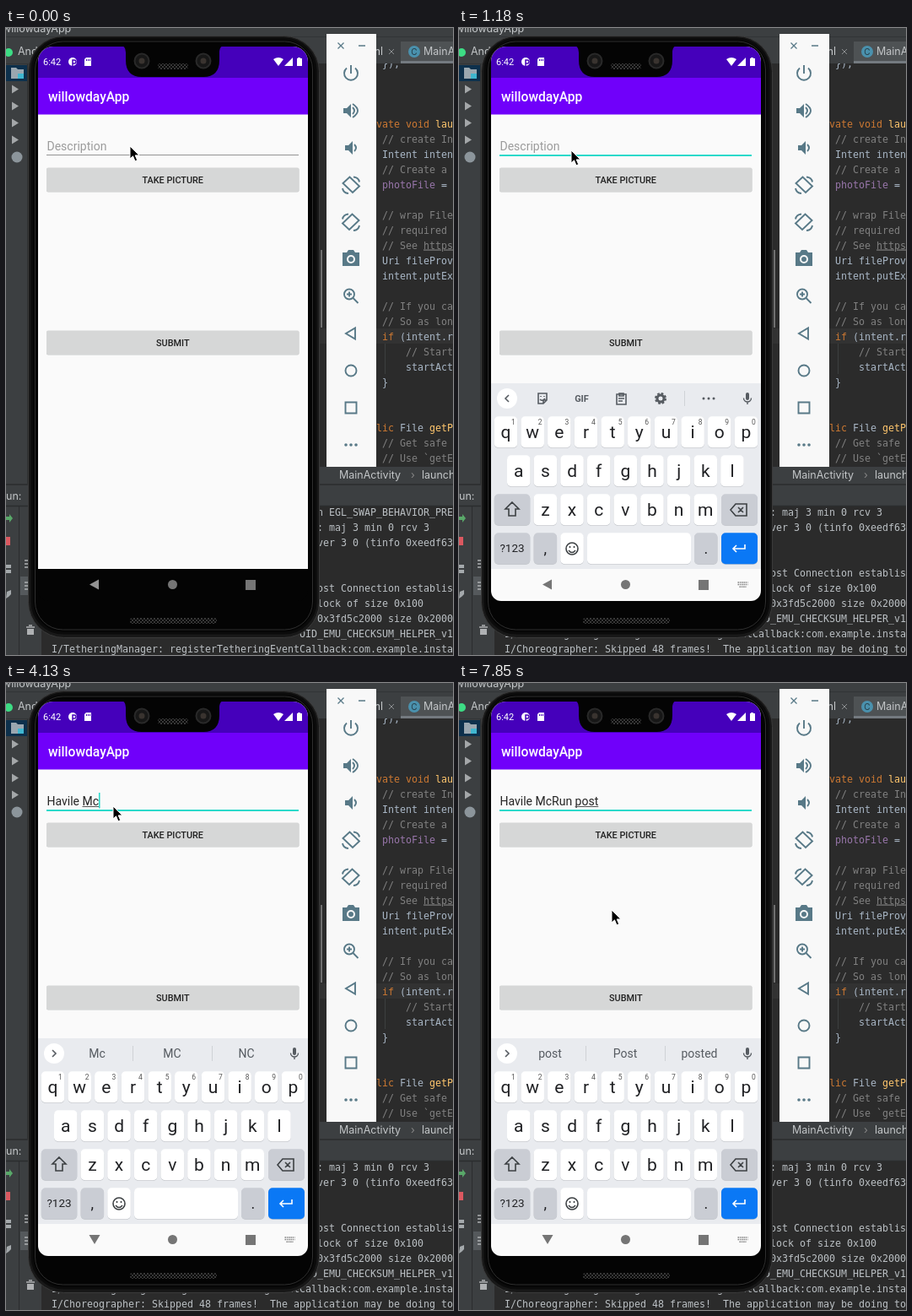
Write an HTML page that moves like this. It is 530 px wide and 743 px high and loops after 8000 ms.

```html
<!DOCTYPE html>
<html lang="en">
<head>
<meta charset="utf-8">
<title>Post form demo</title>
<style>
html, body { margin: 0; width: 100%; height: 100%; overflow: hidden; background: #3c3f41; }
svg { display: block; width: 100vw; height: 100vh; }
text { white-space: pre; }
.ide { font: 12.5px Inter, sans-serif; fill: #c3c6c8; }
.mono { font: 11.63px "DejaVu Sans Mono", monospace; fill: #bbc0c4; }
.phone { font-family: Roboto, sans-serif; }
.mid { text-anchor: middle; }
.line { fill: none; stroke: currentColor; stroke-width: 1.6; }
.tools { color: #587987; }
.tools .line { stroke-width: 1.9; }
.kb { color: #565b61; }
.field { font-size: 14px; }
</style>
</head>
<body>
<svg viewBox="0 0 530 743">
  <defs>
    <clipPath id="screen"><path d="M38 40a18 18 0 0 1 18-18h284a18 18 0 0 1 18 18v627a12 12 0 0 1-12 12H50a12 12 0 0 1-12-12z"/></clipPath>
    <pattern id="mesh" width="4" height="4" patternUnits="userSpaceOnUse">
      <path d="M0 0 4 4M4 0 0 4" stroke="#444" stroke-width=".8"/>
    </pattern>
  </defs>

  <!-- IDE -->
  <rect width="530" height="743" fill="#3c3f41"/>
  <path d="M0 10.5H530M0 42.5H530" stroke="#323436"/>
  <rect x="360" y="42" width="170" height="478" fill="#2b2b2b"/>
  <rect x="360" y="356" width="170" height="18" fill="#323232"/>
  <path d="M449.5 374v36" stroke="#3d3f40"/>
  <g id="code" class="mono"></g>
  <rect x="360" y="11" width="170" height="31" fill="#3c3f41"/>
  <rect x="468" y="16" width="62" height="26" fill="#4e5254"/>
  <rect x="468" y="39" width="62" height="3" fill="#747a80"/>
  <circle cx="484" cy="28" r="7" fill="#4a91ad"/>
  <g class="ide">
    <text x="-4" y="4.500">willowdayApp</text>
    <text x="14" y="32">Android</text>
    <text x="433" y="32">ml</text>
    <text x="484" y="32" class="mid" font-size="10" style="fill:#263b45">C</text>
    <text x="495" y="32">MainActivity</text>
    <text x="395" y="534">MainActivity</text>
    <text x="480" y="534" style="fill:#888">›</text>
    <text x="493" y="534">launchCamera</text>
    <text x="-8" y="559">Run:</text>
  </g>
  <path d="m454 25 6 6m0-6-6 6" stroke="#8a8d8f"/>
  <circle cx="3" cy="29" r="5" fill="#3ddc84"/>
  <rect y="44" width="25" height="19" fill="#0d304c"/>
  <path d="M6 47h6l2 2h7v11H6z" fill="#9aa7b0"/>
  <rect x="14" y="54" width="7" height="6" fill="#40b6d0"/>
  <path d="M7 67.500l8 5-8 5zm0 20 8 5-8 5zm0 20 8 5-8 5zm0 20 8 5-8 5z" fill="#a4a7a9"/>
  <circle cx="13" cy="153" r="6.500" fill="#8c959b"/>
  <path d="M25.500 43V540" stroke="#2d2f30"/>
  <path d="M0 541H530M0 566.500H530" stroke="#2b2d2e" stroke-width="1.500"/>
  <rect x="42" y="567" width="488" height="176" fill="#2b2b2b"/>
  <path d="M15.500 567V743" stroke="#2b2d2e"/>
  <rect x="17" y="650" width="24" height="22" fill="#55595c"/>
  <path d="M0 579h4v-3l4 5-4 5v-3H0z" fill="#59a869"/>
  <rect y="603" width="5" height="10" fill="#db5860"/>
  <path d="M0 636h6v4H0zm0 6h6v4H0zM1 668l5-2v5l-3 3-3 2z" fill="#a4a9ac"/>
  <path d="M22 631h4m-4 4h4m-4 4h4m-4 18h6m-6 4h6m-6 4h6M24 710h10m-7-2h4" stroke="#afb1b3" stroke-width="1.500"/>
  <path d="M25 712h8v7h-8z" fill="#afb1b3"/>
  <g id="console" class="mono"></g>

  <!-- Phone body -->
  <path d="M374 263V355" stroke="#b5b5b5"/>
  <rect x="26.500" y="9.500" width="345" height="713" rx="42" fill="#181818" stroke="#3a3a3a"/>
  <rect x="31" y="13" width="336" height="704" rx="37" fill="#040404" stroke="#0b0b0b" stroke-width="3"/>
  <rect x="34.500" y="16" width="329" height="697" rx="33" fill="#040404" stroke="#2f2f2f"/>
  <rect x="147" y="699" width="103" height="7" rx="3" fill="url(#mesh)"/>

  <!-- Screen -->
  <g class="phone" clip-path="url(#screen)">
    <rect x="38" y="20" width="320" height="621" fill="#fafafa"/>
    <rect x="38" y="20" width="320" height="39" fill="#4500bb"/>
    <rect x="38" y="59" width="320" height="43.500" fill="#7000fa"/>
    <text x="44" y="44" font-size="11" fill="#fff">6:42</text>
    <circle cx="79" cy="40" r="5" fill="#fff"/>
    <path d="M79 45v-7h2a1.500 1.500 0 0 1 0 4h-2" fill="none" stroke="#4500bb" stroke-width="1.500"/>
    <path d="m95 35h6v10h-8v-8zM317 37q6-4 12 0l-6 8zM340 35v10h-10zM346 35h3v1h2v9h-6v-9h1z" fill="#fff"/>
    <path d="M95.500 37v2m2-2v2m2-2v2" stroke="#4500bb"/>
    <text x="50" y="87" font-size="15.600" font-weight="500" fill="#fff">willowdayApp</text>
    <text id="hint" class="field" x="48.500" y="144.500" fill="#9b9b9b">Description</text>
    <text id="typed" class="field" x="48.500" y="144.500" fill="#252525"></text>
    <path id="spell" stroke="#555"/>
    <path id="idle" d="M48 150.500H347" stroke="#949494"/>
    <path id="focus" d="M48 151H347" stroke="#2bd9ca" stroke-width="2"/>
    <path id="caret" stroke="#2bd9ca" stroke-width="1.600"/>
    <g id="buttons" font-size="10.850" font-weight="500"></g>
    <g id="keyboard" class="kb">
      <rect x="38" y="421" width="320" height="221" fill="#e9ebef"/>
      <circle cx="57" cy="439" r="12" fill="#fff"/>
      <path id="chevron" class="line"/>
      <path d="M342 434v5" class="line" style="stroke-width:4;stroke-linecap:round"/>
      <path d="M337.500 438.500a4.500 4.500 0 0 0 9 0M342 443v3" class="line" style="stroke-width:1.400"/>
      <g id="menu">
        <path class="line" d="M94 433h10v8l-4 4h-6zM104 441h-4v4M97 436v1m4-1v1M96 440q3 3 6-1M187 434h11v12h-11zM190 433h5v3h-5zM189 439h7m-7 3h5"/>
        <text x="145.500" y="443" class="mid" font-size="11" font-weight="700" fill="#565b61">GIF</text>
        <circle cx="239" cy="439" r="4" class="line" style="stroke-width:3"/>
        <circle cx="239" cy="439" r="6" class="line" style="stroke-dasharray:2.700 2.012;stroke-width:2"/>
        <path d="M267.500 430v18" stroke="#d0d3d7"/>
        <path d="M290 439h.01m6 0h.01m6 0h.01" class="line" style="stroke-width:3;stroke-linecap:round"/>
      </g>
      <g id="words" class="mid" font-size="14" fill="#565b61"></g>
      <g id="keys" class="mid" fill="#202124"></g>
    </g>
    <rect id="nav" x="38" y="641" width="320" height="38"/>
    <g fill="#757575">
      <path id="back"/>
      <circle cx="197.500" cy="659.500" r="5.500"/>
      <rect x="284" y="654" width="12" height="12"/>
      <path id="switcher" d="M330.500 657h12m-12 2.500h12m-10 2.800h8" stroke="#808080" stroke-width="1.500" stroke-dasharray="1.500 .8"/>
    </g>
  </g>
  <path d="M135 20q7 1 7 9v9q0 20 19 20h73q19 0 19-20v-9q0-8 7-9z" fill="#040404"/>
  <rect x="180" y="42" width="36" height="7" rx="3" fill="url(#mesh)"/>
  <g fill="#171717" stroke="#292929" stroke-width="2">
    <circle cx="161" cy="39" r="8.500"/><circle cx="234" cy="39" r="8.500"/>
  </g>
  <g fill="#39332f"><circle cx="161" cy="39" r="3.500"/><circle cx="234" cy="39" r="3.500"/></g>

  <!-- Emulator controls -->
  <rect x="380" y="7" width="59" height="513" fill="#f8f8f8"/>
  <g class="tools">
    <path class="line" style="stroke-width:1.300" d="m393.500 17.500 7 7m0-7-7 7M418 21h8"/>
    <path class="line" d="M404 47.500a8 8 0 1 0 10 0M409 44v10"/>
    <path fill="currentColor" d="M400 95h4l5-5v16l-5-5h-4zM402 139h4l5-5v16l-5-5h-4z"/>
    <path class="line" d="M411 94q4 4 0 8M411 90q12 8 0 16M413 138q4 4 0 8"/>
    <g id="rotate"><path class="line" d="m399.500 184 8-7.500 11.500 11-8 7.500zM412 176.500q6 .5 7 6M399 190q1 5.500 7 6"/></g>
    <use href="#rotate" transform="matrix(-1 0 0 1 818 44)"/>
    <path fill="currentColor" d="M399 266h5l2-3h6l2 3h5v16h-20z"/>
    <circle cx="409" cy="274" r="4" fill="currentColor" stroke="#f8f8f8" stroke-width="2"/>
    <circle cx="407" cy="315.500" r="6" class="line"/>
    <path class="line" d="m411.500 320 6 6M404 315.500h6m-3-3v6M414 355.500v13l-11-6.500z"/>
    <circle cx="409" cy="406" r="6.500" class="line"/>
    <path class="line" d="M402.500 443.500h13v13h-13z"/>
    <path class="line" style="stroke-width:3.600;stroke-linecap:round" d="M403 494h.01m6 0h.01m6 0h.01"/>
  </g>

  <path id="mouse" d="M0 0v15l3.500-3.200 2.500 6 2.700-1.200-2.500-5.700h4.800z" fill="#000" stroke="#fff"/>
</svg>
<script>
const $ = id => document.getElementById(id);
const show = (id, on) => { $(id).style.display = on ? '' : 'none'; };

// Editor: [row, x, text, colour], rows 18 px apart
const GREY = '#808080', ORANGE = '#cc7832', PLAIN = '#a9b7c6', YELLOW = '#ffc66d', PURPLE = '#9876aa';
$('code').innerHTML = [
  [0, 446, '});', PLAIN],
  [4, 418, 'private void', ORANGE], [4, 509, 'launchCamera', YELLOW],
  [5, 446, '// create Intent', GREY],
  [6, 446, 'Intent intent', PLAIN],
  [7, 446, '// Create a File', GREY],
  [8, 446, 'photoFile', PURPLE], [8, 516, '=', PLAIN],
  [10, 446, '// wrap File', GREY],
  [11, 446, '// required', GREY],
  [12, 446, '// See <tspan text-decoration="underline">https</tspan>', GREY],
  [13, 446, 'Uri fileProvider', PLAIN],
  [14, 446, 'intent.putExtra', PLAIN],
  [16, 446, '// If you call', GREY],
  [17, 446, '// So as long', GREY],
  [18, 446, 'if', ORANGE], [18, 467, '(intent.resolve', PLAIN],
  [19, 474, '// Start', GREY],
  [20, 474, 'startActivity', PLAIN],
  [21, 446, '}', PLAIN],
  [24, 418, 'public', ORANGE], [24, 467, 'File', PLAIN], [24, 502, 'getPhoto', YELLOW],
  [25, 446, '// Get safe', GREY],
  [26, 446, '// Use `getExternal', GREY]
].map(([row, x, s, c]) => `<text x="${x}" y="${row * 18 + 45.5}" style="fill:${c}">${s}</text>`).join('');

const LOG = [
  [45, 'n EGL_SWAP_BEHAVIOR_PRE'], [45, ': maj 3 min 0 rcv 3'], [45, 'ver 3 0 (tinfo 0xeedf63'], [0, ''], [0, ''],
  [45, 'ost Connection establis'], [45, 'lock of size 0x100'], [45, '0x3fd5c2000 size 0x2000'],
  [42, 'OID_EMU_CHECKSUM_HELPER_v1'],
  [0, 'I/TetheringManager: registerTetheringEventCallback:com.example.insta'],
  [0, 'I/Choreographer: Skipped 48 frames!  The application may be doing to']
];
const drawLog = first => {
  $('console').innerHTML = LOG.slice(first, first + 10)
    .map(([col, s], i) => `<text x="${54 + col * 7}" y="${578 + i * 18}">${s}</text>`).join('');
};

$('buttons').innerHTML = [[165.5, 'TAKE PICTURE'], [358.5, 'SUBMIT']].map(([y, s]) =>
  `<rect x="48" y="${y + .5}" width="299.500" height="28.500" rx="2" fill="#c8c9c9"/>
   <rect x="48" y="${y}" width="299.500" height="28.500" rx="2" fill="#d6d7d7"/>
   <text x="197.750" y="${y + 18.7}" class="mid" fill="#202020">${s}</text>`).join('');

// Keyboard
const key = (x, y, w, label = '', fill = '#fff', size = 21) =>
  `<rect x="${x}" y="${y}" width="${w}" height="37" rx="5" fill="#c4c7cc"/>
   <rect x="${x}" y="${y - .7}" width="${w}" height="37" rx="5" fill="${fill}"/>
   <text x="${x + w / 2}" y="${y + 18 + size * .33}" font-size="${size}">${label}</text>`;
const row = (letters, x, y) => [...letters].map((c, i) => key(x + i * 31.65, y, 27.5, c)).join('');
const SIDE = '#cacdd4';
$('keys').innerHTML = row('qwertyuiop', 41.8, 461) + row('asdfghjkl', 57, 507) + row('zxcvbnm', 88.6, 553) +
  [...'1234567890'].map((n, i) => `<text x="${64.5 + i * 31.65}" y="470" font-size="8.500" fill="#555">${n}</text>`).join('') +
  key(41.8, 553, 42.5, '', SIDE) + key(311, 553, 43, '', SIDE) +
  key(41.8, 599, 42.5, '?123', SIDE, 13.5) + key(88.6, 599, 27.5, ',', SIDE, 18) + key(120.3, 599, 27.5) +
  key(152, 599, 123, '') + key(279, 599, 27.5, '.', SIDE, 18) + key(311, 599, 43, '', '#0a78f5') +
  `<g class="line" style="color:#3c4043"><path d="m63 562 8 8h-4v8h-8v-8h-4zM328 564h13v14h-13l-6-7zM331 568l6 6m0-6-6 6"/>
   <circle cx="134" cy="617" r="7"/><path d="M130 619q4 5 8 0M131.500 614v2m5-2v2"/>
   <path d="M339 612v5h-14m4-4-4 4 4 4" stroke="#fff"/></g>`;

const drawWords = words => {
  $('words').innerHTML = words.map((w, i) => `<text x="${[108, 197, 285][i]}" y="444">${w}</text>`).join('') +
    (words[0] ? '<path d="M150.500 430v18M244.500 430v18" stroke="#cfd2d6"/>' : '');
};

// Each step changes some properties; `mark` is the index where the spelling underline starts
const NEXT = ['I', 'and', 'to'];
const STEPS = [
  [0, { mouse: [147, 140], log: 0, focus: 0, caret: 0, slide: -1, down: 0, text: '', mark: -1, words: [] }],
  [150, { mouse: [140, 143] }],
  [290, { mouse: [133, 145] }],
  [440, { focus: 1, caret: 1 }],
  [740, { log: 1 }],
  [890, { slide: 130 }],
  [1030, { slide: 24 }],
  [1180, { slide: 0, caret: 0 }],
  [1320, { down: 1, caret: 1 }],
  [1470, { mouse: [127, 146] }],
  [1610, { caret: 0 }],
  [1910, { text: 'H', caret: 1 }],
  [2060, { mark: 0, words: ['H', 'He', 'Have'] }],
  [2360, { text: 'Ha' }],
  [2500, { text: 'Hav', words: ['Hav', 'Have', 'Having'] }],
  [2650, { text: 'Havi' }],
  [2800, { text: 'Havile', words: ['', 'Havile', ''] }],
  [2940, { text: 'Havile ' }],
  [3240, { mark: -1, words: NEXT }],
  [3390, { text: 'Havile M' }],
  [3540, { mark: 7, words: ['M', 'My', 'Me'] }],
  [3830, { caret: 0 }],
  [3980, { text: 'Havile Mc', caret: 1 }],
  [4130, { words: ['Mc', 'MC', 'NC'] }],
  [4580, { text: 'Havile McR' }],
  [4880, { words: ['McR', 'McRun', 'Mr'] }],
  [5020, { text: 'Havile McRu' }],
  [5320, { text: 'Havile McRun', words: ['', 'McRun', ''] }],
  [5460, { text: 'Havile McRun ', mark: -1, words: NEXT }],
  [5760, { text: 'Havile McRun p' }],
  [5910, { mark: 13, words: ['p', 'post', 'please'] }],
  [6060, { text: 'Havile McRun po' }],
  [6200, { text: 'Havile McRun pos', words: ['pos', 'post', 'possible'] }],
  [6350, { text: 'Havile McRun post' }],
  [6500, { mark: -1 }],
  [6950, { caret: 0 }],
  [7100, { caret: 1 }],
  [7400, { mark: 13, words: ['post', 'Post', 'posted'] }],
  [7850, { mouse: [181, 269], caret: 0 }]
];

function draw(s) {
  const typed = $('typed'), left = 48.5, open = s.slide >= 0, typing = s.words.length > 0;
  const width = n => n > 0 ? typed.getSubStringLength(0, n) : 0;
  typed.textContent = s.text;
  show('hint', !s.text);
  show('idle', !s.focus);
  show('focus', s.focus);
  show('caret', s.caret);
  $('caret').setAttribute('d', `M${left + .7 + width(s.text.length)} 130v18.500`);
  $('spell').setAttribute('d', s.mark < 0 ? '' :
    `M${left + width(s.mark)} 146.500H${left + width(s.text.trimEnd().length)}`);
  drawLog(s.log);
  show('keyboard', open);
  $('keyboard').setAttribute('transform', `translate(0 ${s.slide})`);
  show('menu', !typing);
  drawWords(s.words);
  $('chevron').setAttribute('d', typing ? 'm55 435 4 4-4 4' : 'm59 435-4 4 4 4');
  $('nav').setAttribute('fill', open ? '#fafafa' : '#040404');
  $('back').setAttribute('fill', open ? '#757575' : '#929292');
  $('back').setAttribute('d', s.down ? 'M98.500 654h13l-6.500 11z' : 'M110 653.500v12l-11-6z');
  show('switcher', open);
  $('mouse').setAttribute('transform', `translate(${s.mouse})`);
}

let current = -1;
function tick(now) {
  const t = now % 8000;
  const count = STEPS.filter(([at]) => at <= t).length;
  if (count !== current) {
    current = count;
    draw(Object.assign({}, ...STEPS.slice(0, count).map(([, change]) => change)));
  }
  requestAnimationFrame(tick);
}
tick(performance.now());
</script>
</body>
</html>
```
